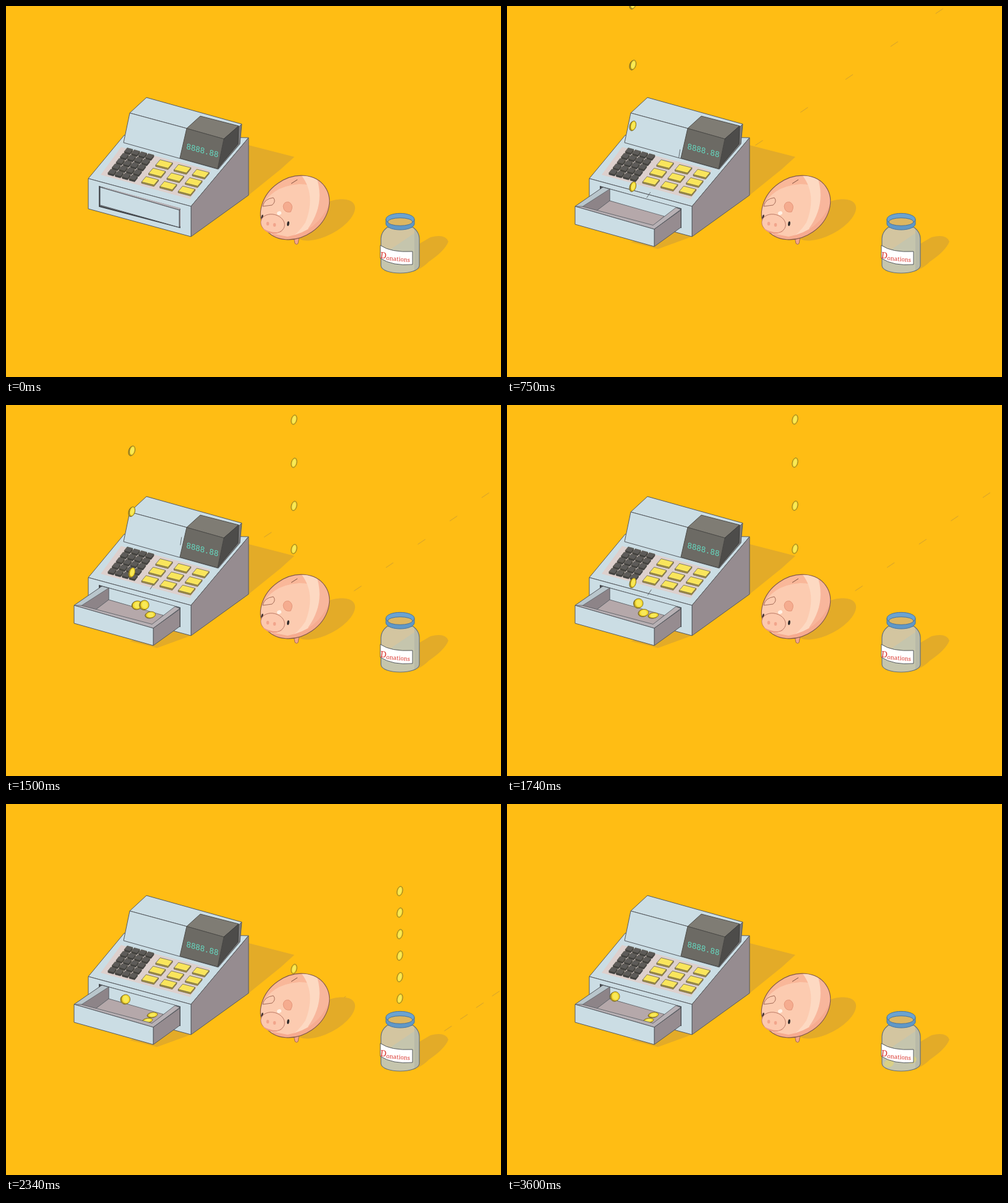
An HTML page with a canvas that plays this animation: 800 by 600 pixels, repeating every 3630 ms.

```html
<!DOCTYPE html>
<html lang="en">
<head>
<meta charset="utf-8">
<title>Coins</title>
<style>
html, body { margin: 0; width: 100%; height: 100%; overflow: hidden; background: #ffbd14; }
canvas { display: block; }
</style>
</head>
<body>
<canvas id="stage" width="800" height="600"></canvas>
<script>
const ctx = document.getElementById('stage').getContext('2d');
const LOOP = 3630;
const INK = '#54585e', BLUE = '#cbdde4', GREY = '#968c90', SHADE = '#e3ab28', STREAK = '#d3a02e';

function paint(fill, stroke, width, path) {
  if (fill) { ctx.fillStyle = fill; ctx.fill(path); }
  if (stroke) { ctx.strokeStyle = stroke; ctx.lineWidth = width; ctx.stroke(path); }
}
function shape(d, fill, stroke, width = 1) { paint(fill, stroke, width, new Path2D(d)); }
function oval(x, y, rx, ry, deg, fill, stroke, width = 1) {
  const path = new Path2D();
  path.ellipse(x, y, rx, ry, deg * Math.PI / 180, 0, 7);
  paint(fill, stroke, width, path);
  return path;
}
function line(x, y, dx, dy, color) { shape(`M${x - dx} ${y - dy}L${x + dx} ${y + dy}`, null, color); }
function scoped(draw) { ctx.save(); draw(); ctx.restore(); }
const clamp = v => Math.min(1, Math.max(0, v));
const mix = (a, b, k) => a + (b - a) * k;

// Three streams: first coin enters at `start`, coins vanish at `end`, shadows lie on `floor`
const toRegister = { x: 204, start: 423, speed: .89, gap: 98.4, count: 10, top: -20, end: 335, floor: 370 };
const toPig = { x: 465.5, start: 1233.3, speed: .87, gap: 69.7, count: 11, top: -20, end: 284, floor: 372 };
const toJar = { x: 636.5, start: 1744.6, speed: .878, gap: 34.8, count: 12, top: 50, end: 342, floor: 420 };
const streams = [toRegister, toPig, toJar];

function eachCoin(s, t, visit) {
  for (let i = 0; i < s.count; i++) {
    const y = (t - s.start) * s.speed - i * s.gap;
    if (y < s.end) visit(y);
  }
}
function coin(x, y, rx, ry, deg, thick) {
  if (thick) oval(x - thick, y + thick / 2, rx, ry, deg, '#d5b325', '#6f6122');
  oval(x, y, rx, ry, deg, '#f3d92f', '#85732a');
  oval(x, y, rx * .6, ry * .72, deg, '#f8e95a');
}
function groundShadows(t) {
  for (const s of streams) eachCoin(s, t, y => {
    const h = s.floor - y;
    if (s !== toRegister || y < 110) line(s.x + h * .74, s.floor - h * .541, 6, -4, STREAK);
  });
}
function registerShadows(t) {
  eachCoin(toRegister, t, y => {
    if (y > 155 && y < 216) line(315.5 - y * .19, 72.5 + y * .857, -1, 6.5, '#62696e');
    else if (y >= 216 && y < 300) line(326 - y * .333, 139 + y * .571, 3, -4.5, '#62696e');
  });
}
function fallingCoins(t) {
  for (const s of streams) scoped(() => {
    ctx.beginPath();
    ctx.rect(0, 0, 800, s.end);
    ctx.clip();
    eachCoin(s, t, y => { if (y > s.top) coin(s.x, y, 4.4, 7.8, 14, s === toRegister ? 1.4 : 0); });
  });
}

// A coin that bounces across the drawer and falls flat
function bouncingCoin(t, start, x, y, ry) {
  const u = clamp((t - start) / 950), ease = u * (2 - u);
  if (u > 0) coin(mix(204, x, ease), mix(335, y, ease) - 20 * Math.abs(Math.sin(u * 9.42)) * (1 - u),
    8, mix(7.5, ry, u), -8, 1);
}
// A coin that stays upright and rolls to the left, slowing down
function rollingCoin(t) {
  const k = clamp((t - 1130) / 250);
  if (!k) return;
  const x = mix(204, 166 + 37 * Math.exp((2010 - t) / 1130), k);
  coin(x, mix(335, 318 - (203 - x) * .25, k), 7, 7.5, -12, 1.5);
}
function sinkingCoin(t, start, x, y) {
  const k = 1 - Math.exp((start - t) / 200);
  if (k > 0) oval(mix(640, x, k), mix(375, y, k), 8, 6, -15, '#eedc62');
}

function drawer(t) {
  const p = clamp((t - 30) / 630) - 1;
  const closed = -(2.7 * p * p * p + 1.7 * p * p);
  scoped(() => {
    ctx.clip(new Path2D('M150 291L282 327V359L218 407L86 372V340Z'));
    ctx.translate(42 * closed, -31 * closed);
    shape('M110 324L155 293L281 328L238 361Z', '#b9c6cc', INK);
    shape('M166 296L276 326L254 341L166 315Z', BLUE, INK, .7);
    shape('M121 325L166 296V315L145 331Z', '#8d8488', INK, .7);
    shape('M145 331L166 315L254 340L236 356Z', '#b5a8aa', INK, .7);
    bouncingCoin(t, 850, 237, 341, 4);
    bouncingCoin(t, 1330, 229, 350, 3.5);
    rollingCoin(t);
    shape('M238 361L281 329L273 326L236 354.5L121 324L110 324Z', '#b7b0b4', INK, .8);
    shape('M238 361L281 330V358L238 389Z', GREY, INK);
    shape('M110 324L238 361V389L110 353Z', BLUE, INK);
  });
}

// A key is centred on x, y and spanned by the half edges u and v
function key(x, y, u, v, depth, top, side) {
  const at = (i, j, drop = 0) => `${x + i * u[0] + j * v[0]} ${y + i * u[1] + j * v[1] + drop}`;
  shape(`M${at(-1, 1)}L${at(1, 1)}L${at(1, -1)}L${at(1, -1, depth)}L${at(1, 1, depth)}L${at(-1, 1, depth)}Z`, side, '#45453f', .7);
  shape(`M${at(-1, -1)}L${at(1, -1)}L${at(1, 1)}L${at(-1, 1)}Z`, top, '#57544a', .7);
}
function keypad(cols, rows, x, y, dx, dy, draw) {
  for (let r = 0; r < rows; r++)
    for (let c = 0; c < cols; c++) draw(x + c * dx[0] + r * dy[0], y + c * dx[1] + r * dy[1]);
}

function register(t) {
  shape('M392 225L466 244L444 264L392 306Z', SHADE);
  if (t > 60) shape('M200 382L244 393L299 373L281 356Z', SHADE);
  shape('M133 279L191 209L392 213L299 324Z', BLUE, INK);
  shape('M299 324L392 213V306L299 373Z', GREY, INK);
  shape('M133 279L299 324V373L133 328Z', BLUE, INK);
  shape('M151 292L281 328V358L151 324Z', '#777a7e', '#3a3d41', 1.8);
  shape('M186 228L331 266L297 312L153 273Z', '#ddd0cd');

  shape('M355 215L381 191L378 223L343 264Z', '#7c7b7a', INK);
  shape('M200 173L227 148L381 191L355 215Z', BLUE, INK);
  shape('M200 173L355 215L343 264L190 221Z', BLUE, INK);
  shape('M292 198L314 178L376 194L352 215Z', '#7f7c74', '#4c4b48');
  shape('M352 215L376 194L375 223L342 263Z', '#4d4c4a', '#3c3c3b');
  shape('M292 198L352 215L342 263L281 246Z', '#6c6a64', '#4c4b48');
  scoped(() => {
    ctx.transform(1, .27, -.12, 1, 291, 231);
    ctx.font = '12.3px "DejaVu Sans Mono", monospace';
    ctx.fillStyle = '#66d6be';
    ctx.fillText('8888.88', 0, 0);
  });

  keypad(4, 5, 198, 233.5, [11.4, 3.1], [-6.6, 8.6], (x, y) => key(x, y, [4.4, 1.2], [-2.3, 2.9], 3, '#5d5b59', '#403f3e'));
  keypad(3, 3, 255.5, 255.5, [29.6, 7.7], [-11.4, 13.6], (x, y) => key(x, y, [10, 2.6], [-3.6, 4.3], 2.2, '#f9e55c', '#bfa33c'));
  registerShadows(t);
  drawer(t);
}

function pig() {
  oval(515, 346, 54, 25, -28, SHADE);
  shape('M465 374L467 384Q470 387 472 384L474 373Z', '#f5a68b', '#8f5a4c', .8);
  scoped(() => {
    ctx.clip(oval(467, 326, 59, 48, -35, '#fccbb0'));
    shape('M408 340Q420 292 474 288Q512 288 520 320L530 270H400Z', '#f9b799');
    shape('M476 272Q502 304 484 350Q470 372 450 380Q500 376 514 330Q516 296 497 272Z', '#fdd9c2');
    shape('M500 272Q518 318 488 360L505 370L530 330V280Z', '#f8b69c');
    shape('M523 318Q505 364 455 373L430 368L440 390H530Z', '#f6ab90');
  });
  oval(467, 326, 59, 48, -35, null, '#82584a', 1.1);
  line(466, 284, 5, -3.2, '#80503f');
  shape('M415 324Q417 312 432 310Q437 316 430 322Z', '#fccbb1', '#9b6250', .9);
  shape('M448 324Q449 316 457 317Q466 322 460 333Q449 335 448 324Z', '#f5ac8f', '#e08d72', .8);
  oval(441.5, 335, 3.6, 3, -20, '#fff0e4');
  oval(414, 341, 1.4, 3.5, 15, '#3d2e2c');
  oval(431, 352, 19.5, 15, 14, '#fcc8ae', '#b3705d', .9);
  shape('M414 359Q427 374 448 364Q432 370 414 359Z', '#ec9c84');
  oval(423, 352, 2.3, 3, 0, '#f2a58c');
  oval(434, 354, 2.3, 3, 0, '#f2a58c');
  oval(456, 352, 1.8, 3.8, 8, '#2c2728');
}

function jar(t) {
  shape('M640 431Q664 433 684 413Q709 396 715 381Q710 368 686 374L650 395Z', SHADE);
  const body = new Path2D('M616 358Q606 366 606 376V420C608 436 666 436 668 420V376Q668 366 658 358Z');
  scoped(() => {
    ctx.clip(body);
    paint('#d3c5a0', null, 0, body);
    shape('M668 362L606 404V440H670Z', '#c5c5ad');
    shape('M660 360V436H670V360Z', '#b9baa8');
    ctx.globalAlpha = .5;
    sinkingCoin(t, 2430, 654, 414);
    sinkingCoin(t, 2640, 617, 420);
  });
  paint(null, '#667078', 1.2, body);
  shape('M605 387Q622 399 657 397V418Q625 421 605 408Z', '#fff', '#555a5e');
  scoped(() => {
    ctx.translate(606, 407);
    ctx.rotate(.09);
    ctx.fillStyle = '#d9362f';
    ctx.font = '14px "Noto Serif", serif';
    ctx.fillText('D', -1.5, 1);
    ctx.font = '9.4px "Noto Serif", serif';
    ctx.fillText('onations', 8.5, 3);
  });
  shape('M614 345V353C618 365 656 365 660 353V345Z', '#5f98c8', '#49749c');
  oval(637, 345, 23, 9.7, 0, '#6ba3d0', '#49749c');
  oval(637, 349, 20, 6.3, 0, '#dcb661', '#49749c');
}

function draw(t) {
  ctx.fillStyle = '#ffbd14';
  ctx.fillRect(0, 0, 800, 600);
  groundShadows(t);
  register(t);
  pig();
  jar(t);
  fallingCoins(t);
}
function frame() {
  draw(performance.now() % LOOP);
  requestAnimationFrame(frame);
}
frame();
</script>
</body>
</html>
```
